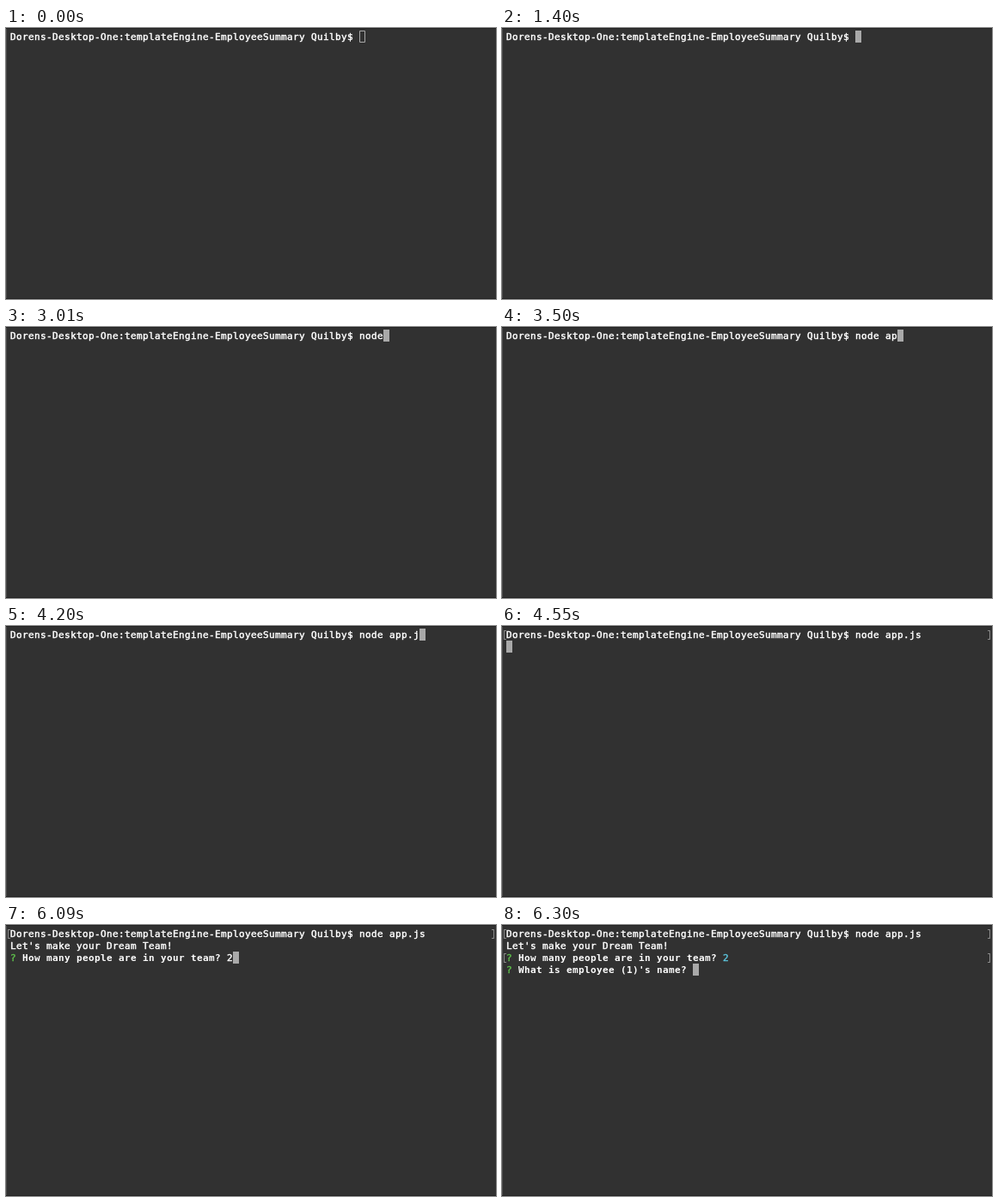
An HTML page with a canvas that plays this animation: 570x316 px, repeating every 8 s.

```html
<!DOCTYPE html>
<html lang="en">
<head>
<meta charset="utf-8">
<title>Terminal session</title>
<style>
html, body { margin: 0; width: 100%; height: 100%; overflow: hidden; background: #313131; }
canvas { display: block; width: 570px; height: 316px; }
</style>
</head>
<body>
<canvas id="stage" width="570" height="316"></canvas>
<script>
const ctx = document.getElementById('stage').getContext('2d');
const LOOP = 8000;
const LEFT = 5, TOP = 3, CELL = 7, ROW = 14;
const FONT = '11px "DejaVu Sans Mono", monospace';
const WHITE = '#ffffff', GREEN = '#5fc04c', CYAN = '#5cc4dc', GREY = '#a9a9a9', MARK = '#8a8a8a';

const PROMPT = 'Dorens-Desktop-One:templateEngine-EmployeeSummary Quilby$ ';
const COMMAND = 'node app.js';
const KEY_TIMES = [2520, 2800, 2870, 3010, 3150, 3290, 3500, 3640, 3850, 4200, 4270];
const FOCUS = 1400, RUN = 4550, ASK_SIZE = 4760, TYPE_SIZE = 6090, ENTER = 6230, ASK_NAME = 6300;
const SIZE_QUESTION = 'How many people are in your team? ';
const NAME_QUESTION = "What is employee (1)'s name? ";

const colX = col => LEFT + col * CELL;
const rowY = row => TOP + row * ROW;

// One glyph per terminal cell
function write(text, col, row, color = WHITE, bold = false) {
  const y = rowY(row) + 11;
  ctx.font = (bold ? 'bold ' : '') + FONT;
  ctx.fillStyle = ctx.strokeStyle = color;
  ctx.lineWidth = 0.45;
  ctx.lineJoin = 'round';
  [...text].forEach((glyph, i) => {
    const x = colX(col + i);
    ctx.fillText(glyph, x, y);
    // Slight emboldening, like smoothed terminal type
    if (!bold) ctx.strokeText(glyph, x, y);
  });
}

function cursor(col, row, filled = true) {
  const x = colX(col), y = rowY(row);
  if (filled) {
    ctx.fillStyle = GREY;
    ctx.fillRect(x, y, CELL, ROW);
  } else {
    ctx.strokeStyle = GREY;
    ctx.lineWidth = 1;
    ctx.strokeRect(x + 0.5, y + 0.5, CELL - 1, ROW - 1);
  }
}

function lineMarks(row) {
  const y = rowY(row) + 2;
  ctx.fillStyle = MARK;
  for (const [stem, tick] of [[2, 2], [567, 565]]) {
    ctx.fillRect(stem, y, 1, 11);
    ctx.fillRect(tick, y, 3, 1);
    ctx.fillRect(tick, y + 10, 3, 1);
  }
}

function question(text, row) {
  write('?', 0, row, GREEN);
  write(text, 2, row, WHITE, true);
  return text.length + 2;
}

function background() {
  ctx.fillStyle = '#313131';
  ctx.fillRect(0, 0, 570, 316);
  ctx.fillStyle = '#232323';
  ctx.fillRect(0, 0, 570, 1);
  ctx.fillRect(0, 315, 570, 1);
  ctx.fillStyle = '#4b4b4b';
  ctx.fillRect(0, 1, 1, 314);
}

function draw(t) {
  background();
  const typed = KEY_TIMES.filter(k => t >= k).length;
  write(PROMPT + COMMAND.slice(0, typed), 0, 0);
  if (t < RUN) {
    cursor(PROMPT.length + typed, 0, t >= FOCUS);
    return;
  }

  lineMarks(0);
  if (t < ASK_SIZE) {
    cursor(0, 1);
    return;
  }

  write("Let's make your Dream Team!", 0, 1);
  const answerCol = question(SIZE_QUESTION, 2);
  if (t >= TYPE_SIZE) write('2', answerCol, 2, t < ENTER ? WHITE : CYAN);
  if (t < ENTER) {
    cursor(answerCol + (t >= TYPE_SIZE ? 1 : 0), 2);
    return;
  }

  lineMarks(2);
  cursor(t < ASK_NAME ? 0 : question(NAME_QUESTION, 3), 3);
}

function tick() {
  draw(performance.now() % LOOP);
  requestAnimationFrame(tick);
}
tick();
</script>
</body>
</html>
```
